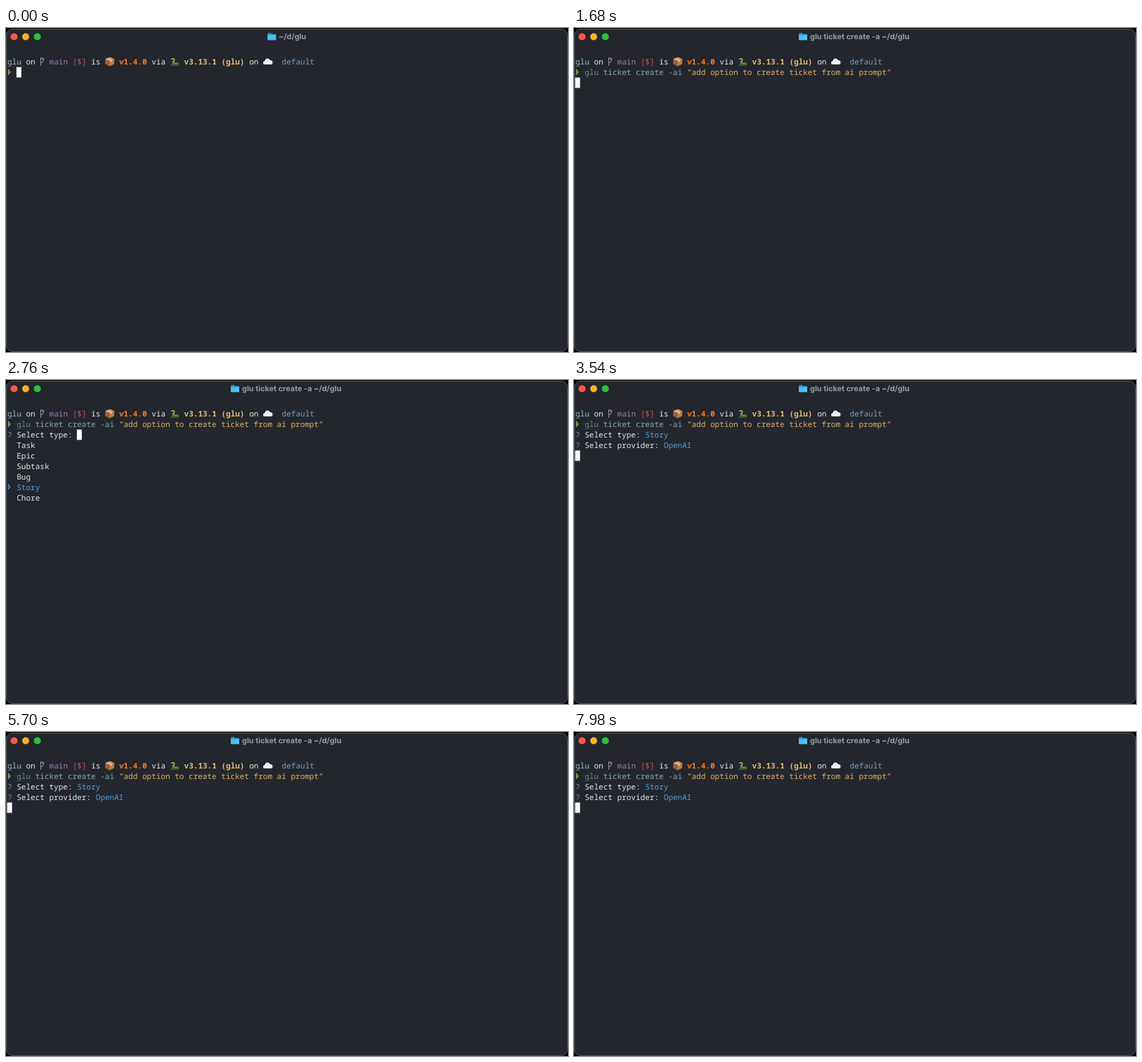
Animation of 800x462 px, one loop 8 s. Source, as an HTML page:

```html
<!DOCTYPE html>
<html lang="en">
<head>
<meta charset="utf-8">
<title>Terminal</title>
<style>
  html, body { margin: 0; width: 100%; height: 100%; overflow: hidden; background: #000; }
  svg { display: block; width: 800px; height: 462px; }
  text { white-space: pre; text-rendering: geometricPrecision; }
  #screen text { font: 11.035px "Noto Sans Mono", "DejaVu Sans Mono", monospace; }
  #screen .medium { font-weight: 500; }
  #screen .bold { font-weight: 600; }
  #title { font: 700 10.9px Inter, sans-serif; fill: #9a9ca1; }
</style>
</head>
<body>
<svg viewBox="0 0 800 462">
  <rect x=".5" y="1.5" width="799" height="460" rx="9" fill="#23262d" stroke="#50535a"/>
  <circle cx="11.5" cy="12.5" r="5" fill="#f9564f"/>
  <circle cx="28" cy="12.5" r="5" fill="#fbb02c"/>
  <circle cx="44.6" cy="12.5" r="5" fill="#29c13d"/>
  <g id="folder">
    <path d="M0 1.2Q0 0 1.2 0H4.5L6 1.5H11Q12 1.5 12 2.6V9.2Q12 10.3 11 10.3H1Q0 10.3 0 9.2Z" fill="#2594cf"/>
    <path d="M0 3H12V9.2Q12 10.3 11 10.3H1Q0 10.3 0 9.2Z" fill="#52bdf0"/>
  </g>
  <text id="title" y="16.2"></text>
  <g id="screen"></g>
  <g id="icons" fill="none">
    <path d="M49.5 42V54" stroke="#a98a9c"/>
    <path d="M50 44L53.2 43V46.5L50.5 50" stroke="#c4c5c9" stroke-width=".9"/>
    <g stroke="none">
      <path d="M141.3 44.3L148 41.8L154 44.2V51.2L147.5 54.6L141.3 51.4Z" fill="#9a6237"/>
      <path d="M141.3 44.3L148 41.8L154 44.2L147.5 47Z" fill="#d2a06c"/>
      <path d="M147.5 47L154 44.2V51.2L147.5 54.6Z" fill="#b77b48"/>
      <path d="M143.8 43.3L150.5 45.8V48.3L148.8 49V46.5L142.5 44Z" fill="#e7c79c"/>
    </g>
    <path d="M235.8 44H238.6Q240.6 44.4 239.4 46.6L238 48.8Q237.2 50.6 239.8 50.4H243.5" stroke="#7f9f3e" stroke-width="1.8" stroke-linecap="round"/>
    <path d="M235 52.8H243.5Q246.5 52.5 245.3 50" stroke="#4f7030" stroke-width="1.5" stroke-linecap="round"/>
    <path d="M239 45.8L237 49" stroke="#c9c268" stroke-width=".8"/>
    <path d="M368.8 52Q366 52 366 49.5Q366 47.3 368.4 47Q369 43.5 372.3 43.5Q375 43.5 376 46Q379.5 46 379.5 49.2Q379.5 52 376.7 52Z" fill="#f1f2f4"/>
    <path d="M367 51Q373 52.8 378.7 50.6Q378 52 376.7 52H368.8Q367.6 52 367 51Z" fill="#c6d0da"/>
  </g>
</svg>
<script>
const LOOP = 8000, COL = 6.62, ROW = 14.92;
const WHITE = '#e6e7e9', BLUE = '#4b9fe0', GREY = '#8d8f94';
const TYPED = 60, ACCEPTED = 420, ENTERED = 960, MENU = 1980,
      TYPE_CHOSEN = 2940, PROVIDER_CHOSEN = 3300;
const types = ['Task', 'Epic', 'Subtask', 'Bug', 'Story', 'Chore'];
const commandText = 'ticket create -ai';
const quotedText = '"add option to create ticket from ai prompt"';

const screen = document.getElementById('screen');
const title = document.getElementById('title');
const folder = document.getElementById('folder');

function add(tag, attributes, content = '') {
  const node = document.createElementNS('http://www.w3.org/2000/svg', tag);
  for (const key in attributes) node.setAttribute(key, attributes[key]);
  node.textContent = content;
  screen.append(node);
}

function write(col, row, content, fill = WHITE, weight = '') {
  add('text', { x: 2 + col * COL, y: 52.2 + row * ROW, fill, class: weight }, content);
}

function chevron(row, stroke) {
  const y = 59.2 + (row - 1) * ROW;
  add('path', { d: `M3.2 ${y}Q3.8 ${y + 2.6} 5.4 ${y + 3.6}Q3.8 ${y + 4.6} 3.2 ${y + 7.2}`,
    fill: 'none', stroke, 'stroke-width': 1.5 });
}

function cursor(col, row) {
  add('rect', { x: 1.6 + col * COL, y: 40.8 + row * ROW, width: 7, height: 14.8, fill: '#fff' });
}

function question(row, label, answer) {
  write(0, row, '?', GREY);
  write(2, row, label);
  const end = 3 + label.length;
  if (answer) write(end, row, answer, BLUE);
  else cursor(end, row);
}

function menu(row, options, chosen) {
  options.forEach((option, i) => write(2, row + i, option, option === chosen ? BLUE : WHITE));
  chevron(row + options.indexOf(chosen), BLUE);
}

function prompt() {
  write(0, 0, 'glu', '#8fb8c6', 'medium');
  write(4, 0, 'on');
  write(9, 0, 'main', '#9c7ab0', 'medium');
  write(14, 0, '[$]', '#c4525a', 'medium');
  write(18, 0, 'is');
  write(24, 0, 'v1.4.0', '#f07c26', 'bold');
  write(31, 0, 'via');
  write(38, 0, 'v3.13.1 (glu)', '#e8bd68', 'bold');
  write(52, 0, 'on');
  write(59, 0, 'default', '#7d9dbe', 'medium');
}

function draw(stage) {
  screen.replaceChildren();
  const running = stage >= ENTERED;
  title.textContent = running ? 'glu ticket create -a ~/d/glu' : '~/d/glu';
  title.setAttribute('x', running ? 336 : 388);
  folder.setAttribute('transform', `translate(${running ? 320 : 372.3} 7)`);
  prompt();
  chevron(1, running ? '#b7c65c' : '#d9b94f');

  if (stage >= TYPED) {
    const accepted = stage >= ACCEPTED;
    write(2, 1, 'glu', '#668793');
    write(6, 1, commandText, accepted ? '#86a9b4' : '#5c6068');
    write(24, 1, quotedText, accepted ? '#e0b064' : '#5c6068');
  }
  if (!running) cursor(stage < TYPED ? 2 : stage < ACCEPTED ? 5 : 68, 1);
  else if (stage < MENU) cursor(0, 2);
  else if (stage < TYPE_CHOSEN) {
    question(2, 'Select type:');
    menu(3, types, 'Story');
  } else {
    question(2, 'Select type:', 'Story');
    const done = stage >= PROVIDER_CHOSEN;
    question(3, 'Select provider:', done && 'OpenAI');
    if (done) cursor(0, 4);
    else menu(4, ['OpenAI'], 'OpenAI');
  }
}

const stages = [0, TYPED, ACCEPTED, ENTERED, MENU, TYPE_CHOSEN, PROVIDER_CHOSEN];
const start = performance.now();
let shown = -1;

function tick() {
  const time = (performance.now() - start) % LOOP;
  const stage = stages.findLast(t => t <= time) ?? 0;
  if (stage !== shown) draw(shown = stage);
  requestAnimationFrame(tick);
}
tick();
</script>
</body>
</html>
```
